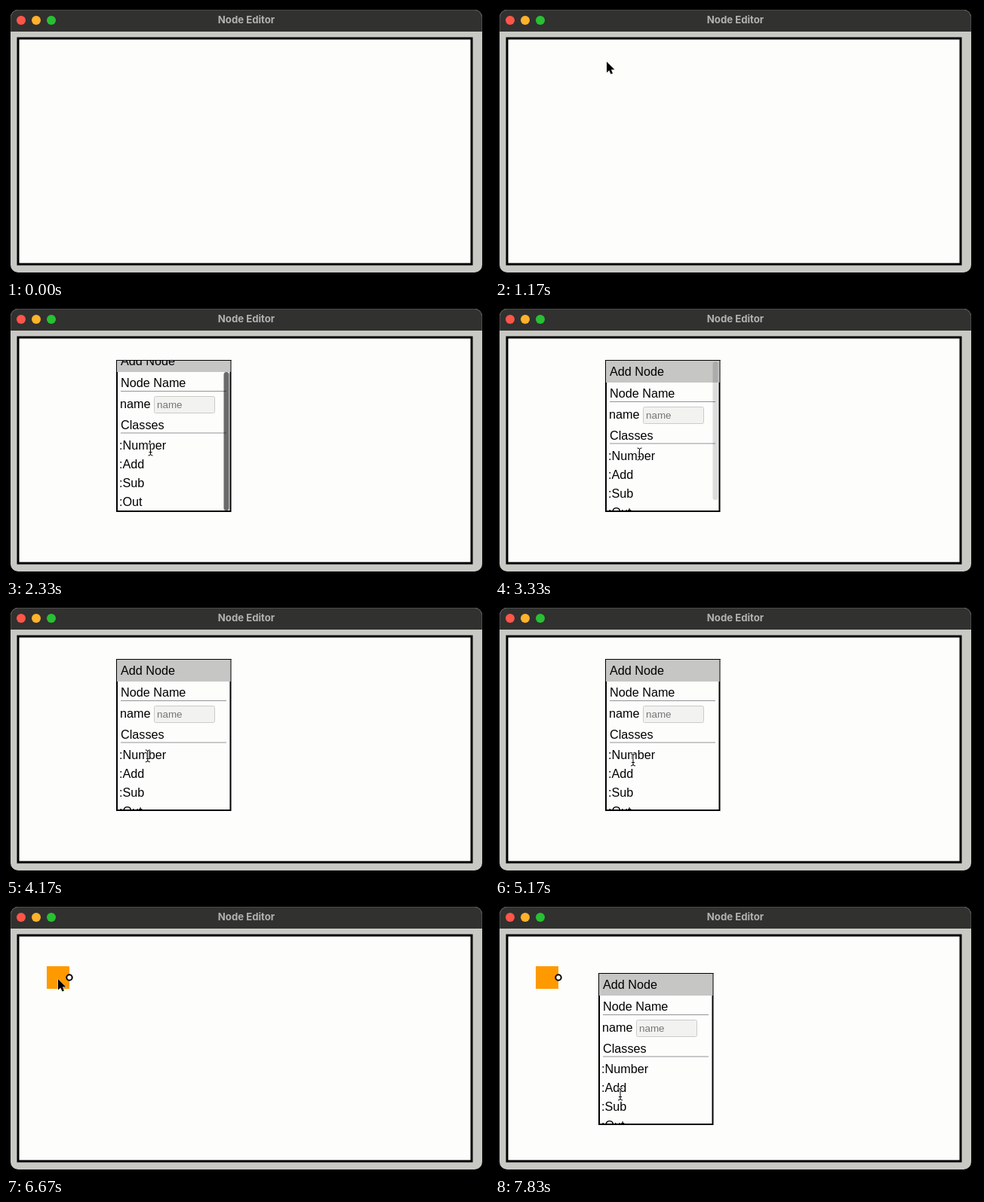
Recreate the animation shown at these times as an HTML page. Size 640 by 360 pixels, loop 8000 ms.

```html
<!DOCTYPE html>
<html lang="en">
<head>
<meta charset="utf-8">
<title>Node Editor</title>
<style>
  html, body { margin: 0; width: 100%; height: 100%; overflow: hidden; background: #000; }
  svg { display: block; width: 100%; height: 100%; }
  text { font: 16.2px "Liberation Sans", Arial, sans-serif; }
  .title { font: 700 13.2px Inter, sans-serif; fill: #b2b2b0; text-anchor: middle; }
  .hint { font-size: 13.4px; fill: #757575; }
  .rule { stroke: #949494; }
  .paper { fill: #fdfdfc; }
</style>
</head>
<body>
<svg viewBox="0 0 640 360">
  <defs>
    <clipPath id="pane"><rect x="147" y="74" width="150.5" height="200"/></clipPath>
    <path id="beamShape" fill="none" d="M-3-8Q0-8 0-6Q0-8 3-8M0-6V6M-3 8Q0 8 0 6Q0 8 3 8M-2 3.5H2"/>
  </defs>

  <rect x="6" y="5" width="625" height="349" rx="10" fill="#c8c9c4"/>
  <path d="M6.5 34V15a9.5 9.5 0 0 1 9.5-9.5H621a9.5 9.5 0 0 1 9.5 9.5V34" fill="#313130" stroke="#4c4c4a"/>
  <circle cx="20" cy="19" r="6" fill="#ff5549"/>
  <circle cx="40" cy="19" r="6" fill="#ffb22a"/>
  <circle cx="60" cy="19" r="6" fill="#28c132"/>
  <text class="title" x="318.5" y="23">Node Editor</text>
  <rect class="paper" x="16" y="43" width="601" height="300" stroke="#000" stroke-width="3"/>

  <g id="node">
    <rect width="30" height="30" fill="#ff9900"/>
    <circle cx="30" cy="15" r="3.7" fill="#fff" stroke="#000" stroke-width="2"/>
  </g>

  <g id="popup">
    <rect class="paper" x="147" y="74" width="150.5" height="200" stroke="#000" stroke-width="2"/>
    <g clip-path="url(#pane)">
      <g id="list">
        <rect x="147" y="73" width="151" height="30" fill="#c6c6c5"/>
        <text x="152" y="94">Add Node</text>
        <text x="152" y="123">Node Name</text>
        <path class="rule" d="M152 128.5H292M152 184H292"/>
        <text x="151" y="151">name</text>
        <rect x="196.500" y="135.5" width="80" height="22" rx="2" fill="#f2f2f1" stroke="#cbcbc8"/>
        <text class="hint" x="200" y="151">name</text>
        <text x="152" y="179">Classes</text>
        <text x="150" y="206">:Number</text>
        <text x="150" y="231">:Add</text>
        <text x="150" y="256">:Sub</text>
        <text x="150" y="281">:Out</text>
      </g>
      <rect id="thumb" x="288.5" y="75" width="7" height="184" rx="3.5"/>
    </g>
    <path d="M146 73.5H298.5" stroke="#000"/>
  </g>

  <path id="arrow" d="M0 0V14.5L3.3 11.5 5.5 16.5 8 15.4 5.9 10.5H10.5Z" stroke="#fff" paint-order="stroke"/>
  <g id="beam">
    <use href="#beamShape" stroke="#fff" stroke-width="2.4"/>
    <use href="#beamShape" stroke="#000"/>
  </g>
</svg>
<script>
const FPS = 6, STEPS = 48;
const [node, popup, list, thumb, arrow, beam] =
  ["node", "popup", "list", "thumb", "arrow", "beam"]
    .map(id => document.getElementById(id));

// Steps at which the user acts.
const OPEN = 8, PICK = 33, GRAB = 36, DROP = 40, REOPEN = 43;

const ease = (n, from, to) => {
  const u = Math.min(1, Math.max(0, (n - from) / (to - from)));
  return u * u * (3 - 2 * u);
};
const mix = (a, b, k) => a.map((v, i) => v + (b[i] - v) * k);
const show = (el, on) => el.style.display = on ? "" : "none";
const move = (el, x, y) => el.setAttribute("transform", `translate(${x} ${y})`);

function cursorAt(n) {
  let p = [236, 300];
  const glide = (x, y, from, to) => p = mix(p, [x, y], ease(n, from, to));
  glide(148, 74, 1, 7);
  glide(191.5, 192, OPEN, 14);
  glide(191.5, 198, 14, 17);
  glide(183, 207, 20, 31);
  glide(32, 61, PICK, GRAB);
  glide(69, 101, GRAB, DROP);
  glide(138, 94, DROP, REOPEN);
  glide(166, 254, REOPEN, STEPS - 1);
  return p;
}

function draw(now) {
  const n = Math.floor((now + 5) * FPS / 1000) % STEPS;
  const again = n >= REOPEN;
  const open = again || (n >= OPEN && n < PICK);
  const typing = open && n >= (again ? REOPEN : OPEN) + 2;
  const scroll = 14 * (ease(n, 9, 13) - ease(n, 18, 20));

  show(popup, open);
  move(popup, again ? -9 : 0, again ? 20 : 0);
  move(list, 0, -scroll);
  move(thumb, 0, scroll);
  thumb.setAttribute("opacity", .58 * ease(n, 9, 10) - .45 * ease(n, 19, 20) - .13 * ease(n, 20, 21));

  show(node, n >= PICK);
  move(node, ...mix([17, 44], [54, 84], ease(n, GRAB, DROP)));

  show(arrow, n > 0 && !typing);
  show(beam, typing);
  move(typing ? beam : arrow, ...cursorAt(n));
}

const start = performance.now();
(function tick() {
  draw(performance.now() - start);
  requestAnimationFrame(tick);
})();
</script>
</body>
</html>
```
